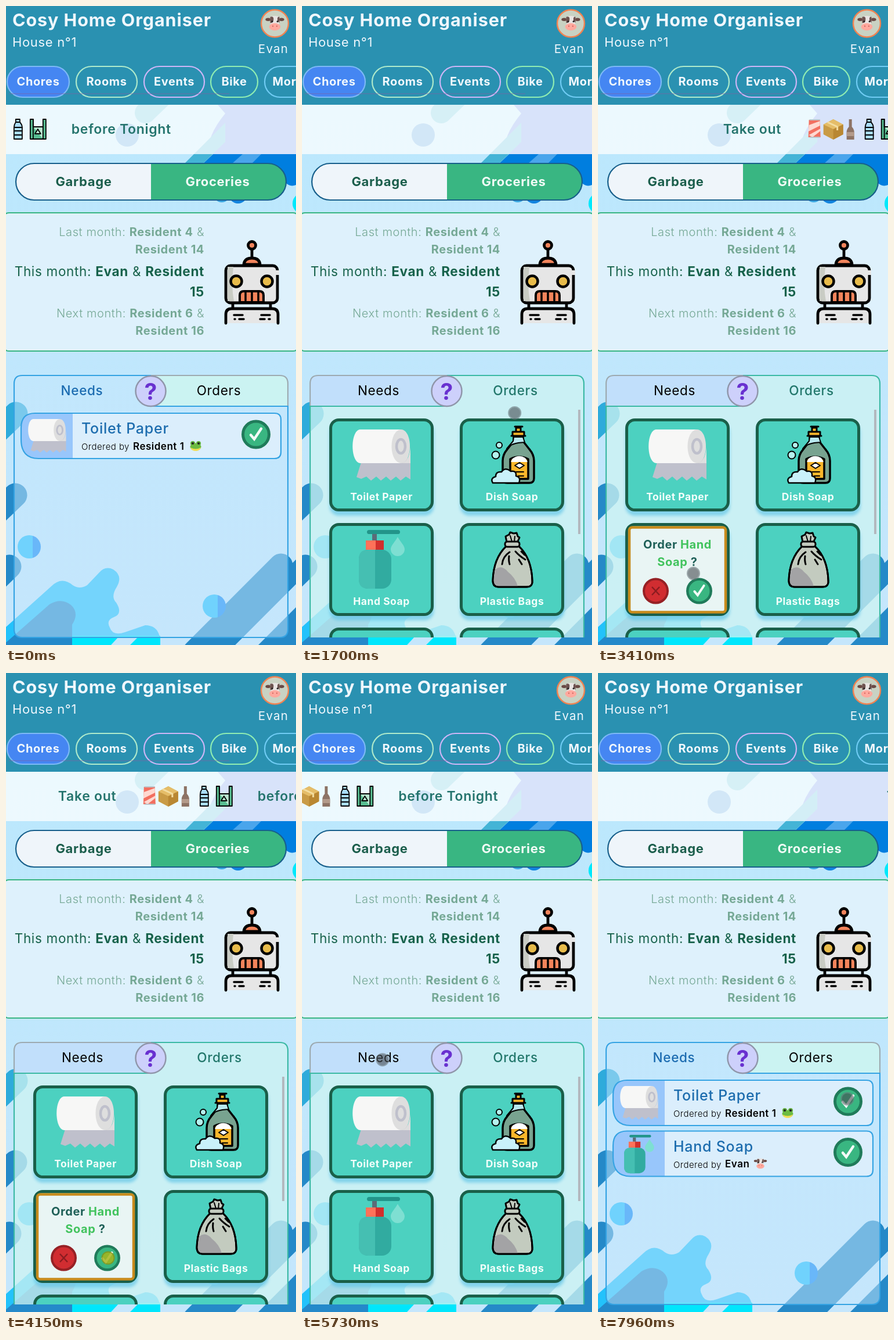
These frames come from a looping animation (500x1100 px, 7990 ms). An HTML page:

```html
<!DOCTYPE html>
<html lang="en">
<head>
<meta charset="utf-8">
<title>House chores</title>
<style>
html, body { margin: 0; width: 100%; height: 100%; overflow: hidden; background: #c1e8fd; }
svg { display: block; width: 100vw; height: 100vh; }
text { font-family: Inter, "Open Sans", sans-serif; letter-spacing: .03em; white-space: pre; }
.b { font-weight: 700; }
.s { font-weight: 600; }
.m { font-weight: 500; }
.l { font-weight: 300; }
.c { text-anchor: middle; }
.e { text-anchor: end; }
.ink { stroke: #000; stroke-linejoin: round; stroke-linecap: round; }
</style>
</head>
<body>
<svg viewBox="0 0 500 1100" preserveAspectRatio="none">
<defs>
  <linearGradient id="sky" x2="0" y2="1"><stop stop-color="#b9e8fd"/><stop offset="1" stop-color="#c5e6fc"/></linearGradient>
  <linearGradient id="duo"><stop offset=".66" stop-color="#1bbefd"/><stop offset=".66" stop-color="#0c88f6"/></linearGradient>
  <filter id="blur" x="-20%" y="-20%" width="140%" height="140%"><feGaussianBlur stdDeviation="2.5"/></filter>
  <clipPath id="panelClip"><path d="M14 690H486V1087H14z"/></clipPath>
  <clipPath id="pillClip"><rect x="17" y="271" width="466" height="63" rx="31.5"/></clipPath>

  <g id="cow">
    <ellipse cx="-10" cy="-5" rx="4" ry="2.4" fill="#6b4a45"/><ellipse cx="10" cy="-5" rx="4" ry="2.4" fill="#6b4a45"/>
    <path d="M-7-9Q0-12 7-9L6 5H-6z" fill="#e9e4e2"/>
    <path d="M-7-9Q-1-11-2-4Q-3 1-7 0zM7-9Q3-10 4-3L7 0z" fill="#6d5350"/>
    <circle cx="-4" cy="-2" r="1.3" fill="#222"/><circle cx="4" cy="-2" r="1.3" fill="#222"/>
    <ellipse cy="6" rx="8.5" ry="5.5" fill="#ffa99e"/>
    <circle cx="-3" cy="5" r="1" fill="#d2665f"/><circle cx="3" cy="5" r="1" fill="#d2665f"/>
  </g>
  <g id="frog">
    <circle cx="-5" cy="-4" r="4" fill="#5fae3c"/><circle cx="5" cy="-4" r="4" fill="#5fae3c"/>
    <ellipse cy="2" rx="9.5" ry="6.5" fill="#6cbb42"/><path d="M-9 3Q0 8 9 3Q7 9 0 9Q-7 9-9 3" fill="#f3dd55"/>
    <circle cx="-5" cy="-4" r="2" fill="#222"/><circle cx="5" cy="-4" r="2" fill="#222"/>
  </g>
  <g id="paper">
    <path d="M17 50H100V86l-8-5-9 7-8-7-9 7-8-7-9 7-8-7-9 7-8-7-9 4-8-3z" fill="#bfc0cc"/>
    <path d="M13 0H84V58H13C-4 56-4 2 13 0z" fill="#f7f7f6"/>
    <path d="M84 0C104 1 104 57 84 58C62 57 62 1 84 0z" fill="#dedede"/>
    <path d="M100 30V58H84Q98 56 100 30" fill="#dedede"/>
    <ellipse cx="83.5" cy="29" rx="7.5" ry="12" fill="#dedede" stroke="#bfc0cc" stroke-width="4.5"/>
  </g>
  <g id="pump">
    <rect x="14" width="57" height="7" rx="3.5" fill="#22958a"/>
    <path d="M23 7H31V18H23z" fill="#5b6c78"/>
    <path d="M12 18H29V34H12z" fill="#ff7159"/><path d="M29 18H43V34H29z" fill="#d22f2c"/>
    <rect y="34" width="56" height="67" rx="16" fill="#31aba0"/>
    <path d="M28 34H16Q0 34 0 50V85Q0 101 16 101H28z" fill="#45bfb2"/>
    <path d="M67 12C72 21 79 27 79 33A12 12 0 0 1 55 33C55 27 62 21 67 12" fill="#7edfd2"/>
  </g>
  <g id="dish" class="ink" stroke-width="3.5">
    <path d="M39 15H55V26L66 40Q74 49 74 60V90Q74 98 66 98H28Q20 98 20 90V60Q20 49 28 40L39 26z" fill="#78a390"/>
    <path d="M35 17H59M37 10H57V17H37zM43 3H51V10H43zM41 1H54" fill="#fbb62b" stroke-width="3"/>
    <path d="M38 26L27 39Q34 29 58 28L55 19H39z" fill="#b9e9f0" stroke-width="2"/>
    <path d="M33 57Q48 49 64 57V91H33z" fill="#fbb62b"/>
    <path d="M34 62H63L59 55Q48 48 37 56z" fill="#fff" stroke="none"/>
    <path d="M41 68L49 63 57 68 49 73z" fill="#fff" stroke-width="2"/>
    <path d="M43 79H56M47 86H56" stroke-width="2"/>
    <path d="M3 98Q-2 90 8 87Q8 78 18 79Q24 70 34 78Q44 76 43 86Q52 88 48 98z" fill="#c9f1fa" stroke-width="2.5"/>
    <circle cx="8" cy="50" r="6.5" fill="#b5f2ee" stroke-width="2"/><circle cx="14" cy="33" r="5" fill="#b5f2ee" stroke-width="2"/>
  </g>
  <g id="bag" class="ink" stroke-width="3">
    <path d="M24 25Q2 46 1 84Q1 95 11 95H59Q70 95 69 84Q68 46 46 25z" fill="#c3cbbf"/>
    <path d="M5 65Q16 56 27 69Q40 79 44 94H11Q1 94 2 82z" fill="#a3a3a5" stroke="none"/>
    <path d="M24 25Q2 46 1 84Q1 95 11 95H59Q70 95 69 84Q68 46 46 25zM30 35Q18 43 17 56M40 34Q47 42 57 48M29 42Q28 50 30 56M50 34L56 40M46 48L51 56" fill="none"/>
    <path d="M25 18L23 8 29 5 31 1 37 3 42 2 44 8 47 10 43 19z" fill="#c3cbbf"/>
    <rect x="22" y="17" width="25" height="9" rx="4" fill="#c3cbbf"/><path d="M31 7L34 17M39 8L38 17" fill="none" stroke-width="2"/>
  </g>
  <g id="tick">
    <circle r="22.5" fill="#39b681" stroke="#207b5a" stroke-width="5"/>
    <path d="M-9 1L-3 8 9-10" fill="none" stroke="#f4fbf8" stroke-width="4.5" stroke-linecap="round"/>
  </g>
  <g id="row">
    <path d="M50 701H463Q474 701 474 712V768Q474 779 463 779H56Q26 779 26 746V726Q26 701 50 701z" fill="#dbeefc"/>
    <path d="M50 701H115V779H56Q26 779 26 746V726Q26 701 50 701z" fill="#98c6fb"/>
    <path d="M50 701H463Q474 701 474 712V768Q474 779 463 779H56Q26 779 26 746V726Q26 701 50 701z" fill="none" stroke="#35a3e3" stroke-width="2.2"/>
    <use href="#tick" x="431" y="737.5"/>
    <text x="130" y="764" font-size="15" class="l">Ordered by</text>
  </g>
  <g id="tile">
    <rect x="-2" y="5" width="180" height="160" rx="16" fill="#5fc4e6" opacity=".65" filter="url(#blur)"/>
    <rect width="175" height="155" rx="14" fill="#4cd1c0" stroke="#1a5f49" stroke-width="5"/>
  </g>
</defs>

<rect width="500" height="1100" fill="url(#sky)"/>

<!-- decorative background -->
<g fill="none" stroke-linecap="round">
  <path d="M240 184L270 155" stroke="#4fbcd6" stroke-width="36"/>
  <circle cx="209" cy="222" r="20" fill="#3f93d8"/>
  <path d="M365 170H500V255H350Q345 225 378 185z" fill="#5b80ea"/>
  <path d="M357 255H500V308Q486 314 474 294L440 271H340z" fill="#007edf"/>
  <path d="M308 271L378 201V234L340 271z" fill="#44b4d6"/>
  <path d="M390 271L408 255H440L424 271z" fill="#4aa5ec"/>
  <circle cx="372" cy="324" r="14" fill="#3ba6e0"/><circle cx="400" cy="324" r="16" fill="#1183df"/>
  <circle cx="512" cy="340" r="18" fill="#00e8fb"/>
  <g stroke="#2589c8" stroke-width="41">
    <path d="M17 702L-25 742" stroke="#2eabdb"/>
    <path d="M16 842L-60 915M6 965L-30 1000M474 963L325 1112"/>
    <path d="M520 954L350 1124" stroke-width="30"/>
    <path d="M500 1035V1100H435z" fill="#2589c8" stroke="none"/>
  </g>
  <path d="M0 1069L78 999Q96 981 115 997Q127 1005 140 997L160 976Q171 963 185 970Q202 981 191 1000Q180 1017 190 1027Q202 1046 186 1052Q172 1057 179 1070Q184 1085 205 1078L240 1066Q267 1066 266 1100H0z" fill="#23c2fb"/>
  <path d="M-5 1100L75 1030Q95 1018 112 1031Q127 1045 114 1065V1100z" fill="#2489ca"/>
  <path d="M114 1100V1084H266V1100z" fill="#00e6fc"/>
  <path d="M181 1100L194 1086H228L214 1100z" fill="#c5e6fc"/>
  <circle cx="40" cy="931" r="20" fill="url(#duo)"/><circle cx="359" cy="1033" r="20" fill="url(#duo)"/>
</g>

<!-- ticker -->
<path d="M0 170H500V255H0z" fill="#fafeff" opacity=".79"/>
<g id="ticker">
  <g font-size="23" fill="#24746d" class="s"><text y="220">Take out</text><text x="344" y="220">before Tonight</text></g>
  <path d="M148 196H167L168 226H147z" fill="#f26f60"/><path d="M148 205L167 198V206L147 216zM148 222L168 211V215L154 226z" fill="#ffd8d0"/><path d="M149 196H167M149 226H167" stroke="#bcc4c9" stroke-width="2"/>
  <path d="M173 204L190 195 207 204V221L190 230 173 221z" fill="#c99b45"/><path d="M173 204L190 195 207 204 190 212z" fill="#e5bd68"/><path d="M190 212L207 204V221L190 230z" fill="#b98732"/><path d="M180 200L197 208V214" fill="none" stroke="#f3dda0" stroke-width="3"/>
  <path d="M217 195H222V208Q226 212 226 217V230H213V217Q213 212 217 208z" fill="#8d7365"/><path d="M213 217H226V224H213z" fill="#b39a8a"/>
  <g class="ink" stroke-width="1.8">
    <path d="M248 195H255V200Q259 204 259 209V229H245V209Q245 204 248 200z" fill="#a9dcf8"/><path d="M245 209H259M245 215H259M245 222H259M248 200H255" fill="none"/>
    <path d="M273 195H278V208H295V195H300V229H273z" fill="#58bd91"/><path d="M278 208H295V229M281 220L286 212 291 220z" fill="#b9e6cf"/><path d="M278 195V229" fill="none"/>
  </g>
</g>

<!-- header -->
<path d="M0 0H500V170H0z" fill="#2a91b1"/>
<g fill="#eff7fd">
  <text x="11" y="35" font-size="30.5" class="b">Cosy Home Organiser</text>
  <text x="11" y="70" font-size="22">House n°1</text>
  <text x="461" y="81" font-size="20.5" class="c" style="letter-spacing:.06em">Evan</text>
</g>
<circle cx="463.5" cy="30" r="23.5" fill="#c9d2c3" stroke="#f08352" stroke-width="2.5"/>
<use href="#cow" transform="translate(463.5 29) scale(1.15)"/>
<g id="pills" font-size="20" class="b c"></g>
<path d="M5 151H385" stroke="#7e62a5" stroke-width="1.3" opacity=".5"/>

<!-- chore toggle -->
<g clip-path="url(#pillClip)"><path d="M17 271H250V334H17z" fill="#eff5fa"/><path d="M250 271H483V334H250z" fill="#39b682"/></g>
<rect x="17" y="271" width="466" height="63" rx="31.5" fill="none" stroke="#175f8b" stroke-width="2.2"/>
<g font-size="22" class="b c"><text x="134" y="310" fill="#1b5e4c">Garbage</text><text x="365" y="310" fill="#f1fbf6">Groceries</text></g>

<!-- monthly turns -->
<rect x="-5" y="356" width="510" height="238" rx="10" fill="#def1fc" stroke="#38b582" stroke-width="2.2"/>
<g class="e" font-size="20" fill="#75a895">
  <text x="342" y="396" class="l">Last month: <tspan class="b">Resident 4</tspan> &amp;</text>
  <text x="342" y="426" class="b">Resident 14</text>
  <text x="342" y="536" class="l">Next month: <tspan class="b">Resident 6</tspan> &amp;</text>
  <text x="342" y="566" class="b">Resident 16</text>
  <g font-size="22.5" fill="#17624b"><text x="342" y="465">This month: <tspan class="b">Evan</tspan> &amp; <tspan class="b">Resident</tspan></text><text x="342" y="500" class="b">15</text></g>
</g>
<g class="ink" stroke-width="4.8" fill="none">
  <path d="M424 418V434"/><circle cx="424" cy="412" r="6.5" fill="#f3845b"/>
  <path d="M410 445Q411 434 424 434Q437 434 438 445z" fill="#f3845b"/>
  <rect x="379" y="447" width="89" height="64" rx="8" fill="#e6e6e6"/>
  <path d="M382 449H392Q388 482 393 508H382z" fill="#c9ccc4" stroke="none"/>
  <path d="M468 463V455" stroke="#e6e6e6" stroke-width="6" stroke-linecap="butt"/>
  <g fill="#e8bb4a" stroke-width="4.5"><circle cx="397" cy="474" r="9.5"/><circle cx="450" cy="474" r="9.5"/></g>
  <path d="M403 510V498Q403 491 410 491H437Q444 491 444 498V510z" fill="#f3845b" stroke-width="4"/><path d="M413 492V507M424 492V507M435 492V507" stroke-width="3.5"/>
  <path d="M379 546V531Q379 521 389 521H459Q469 521 469 531V546" fill="#e6e6e6"/>
  <path d="M391 513V520M456 513V520"/><path d="M393 532H408M402 539H410M394 539H395M440 532H455M438 539H446M453 539H455" stroke-width="3.5"/>
</g>

<!-- needs -->
<g id="needs">
  <path d="M28 636H250V689H486V1073Q486 1087 472 1087H28Q14 1087 14 1073V650Q14 636 28 636z" fill="#c6e8fd" opacity=".5"/>
  <path d="M250 636H472Q486 636 486 650V689H250z" fill="#cbf3f2"/>
  <path d="M250 636H472Q486 636 486 650V689" fill="none" stroke="#9daab0" stroke-width="2.2"/>
  <path d="M250 636H28Q14 636 14 650V1073Q14 1087 28 1087H472Q486 1087 486 1073V689H250" fill="none" stroke="#35a3e3" stroke-width="2.2"/>
  <g font-size="22.5" class="c"><text x="131" y="670" fill="#1b6bb0" class="m">Needs</text><text x="367" y="670">Orders</text></g>
  <use href="#row"/>
  <use href="#paper" transform="translate(38 711) scale(.655)"/>
  <text x="130" y="736" font-size="25" fill="#1c6cae" class="m">Toilet Paper</text>
  <text x="219" y="764" font-size="17" class="s">Resident 1</text><use href="#frog" x="327" y="757"/>
  <g id="soapRow">
    <use href="#row" y="87.5"/>
    <use href="#pump" transform="translate(45 795) scale(.655)"/>
    <text x="130" y="824" font-size="25" fill="#1c6cae" class="m">Hand Soap</text>
    <text x="219" y="851" font-size="17" class="s">Evan</text><use href="#cow" transform="translate(280 844) scale(.8)"/>
  </g>
</g>

<!-- orders -->
<g id="orders">
  <path d="M250 636H472Q486 636 486 650V1087H14V689H250z" fill="#cdf4f2" opacity=".76"/>
  <path d="M28 636H250V689H14V650Q14 636 28 636z" fill="#c1dffb"/>
  <path d="M14 689V650Q14 636 28 636H250" fill="none" stroke="#9daab0" stroke-width="2.2"/>
  <path d="M250 636H472Q486 636 486 650V1087M14 1087V689H250" fill="none" stroke="#3bb9a4" stroke-width="2.2"/>
  <g font-size="22.5" class="c"><text x="132" y="670">Needs</text><text x="368" y="670" fill="#22776b" class="m">Orders</text></g>
  <g clip-path="url(#panelClip)">
    <g id="tiles"></g>
    <g font-size="17.5" fill="#f3fffb" class="b c"><text x="137" y="851">Toilet Paper</text><text x="362" y="851">Dish Soap</text><text x="137" y="1031">Hand Soap</text><text x="362" y="1031">Plastic Bags</text></g>
    <use href="#paper" x="87" y="729"/><use href="#dish" x="326" y="723"/><use href="#pump" x="98" y="902"/><use href="#bag" x="328" y="905"/>
    <g id="ask">
      <rect x="54" y="897.5" width="166" height="146" rx="5" fill="#e9f5f4" stroke="#c88b1c" stroke-width="4.5"/>
      <g font-size="20" class="b c" fill="#1f6058"><text x="137" y="934">Order <tspan fill="#41c35d">Hand</tspan></text><text x="137" y="964"><tspan fill="#41c35d">Soap</tspan> ?</text></g>
      <circle cx="99.5" cy="1007" r="20.5" fill="#d12d31" stroke="#962125" stroke-width="4"/><path d="M93 1000L106 1014M106 1000L93 1014" stroke="#8b1c20" stroke-width="2.5"/>
      <use href="#tick" transform="translate(174.5 1007) scale(.9)"/>
    </g>
    <g id="done"><rect x="52" y="895" width="170" height="150" rx="11" fill="#31a8e1"/><text x="138" y="984" font-size="39" fill="#f3faff" class="b c">Done !</text></g>
  </g>
  <path d="M476 695H480V909H476z" fill="#b3b8be"/>
</g>

<circle cx="249.5" cy="663" r="26" fill="#cdd0fb" stroke="#9096aa" stroke-width="2.5"/>
<text x="250" y="677.5" font-size="39" fill="#6930d0" class="b c">?</text>
<circle id="dot" r="10.5" stroke-width="2"/>
</svg>
<script>
const $ = id => document.getElementById(id);
const LOOP = 7990, TICKER_SPAN = 1036;

$('pills').innerHTML = [
  ['Chores', 2, 107, '#7db9f6', '#4586f2'], ['Rooms', 121, 105, '#aeeacb'], ['Events', 238, 104, '#ceb6f7'],
  ['Bike', 353, 81, '#8fedb2'], ['More', 446, 80, '#70ccf4']
].map(([name, x, w, line, fill = 'none']) =>
  `<rect x="${x}" y="104" width="${w}" height="53" rx="26.5" fill="${fill}" stroke="${line}" stroke-width="2.2"/>
   <text x="${x + w / 2}" y="137" fill="#f1f8fd">${name}</text>`).join('');

for (const y of [712.5, 892.5, 1072.5])
  for (const x of [49.5, 274.5]) $('tiles').innerHTML += `<use href="#tile" x="${x}" y="${y}"/>`;

// Each key is [time, value, ...]; values between keys are linear.
function track(keys, t) {
  let i = 1;
  while (i < keys.length - 1 && t > keys[i][0]) i++;
  const a = keys[i - 1], b = keys[i];
  const k = Math.min(1, Math.max(0, (t - a[0]) / (b[0] - a[0])));
  return a.slice(1).map((v, n) => v + (b[n + 1] - v) * k);
}

const travel = [[0, 731 - TICKER_SPAN], [2580, 143], [4150, 410], [4970, 555], [6570, 813], [7960, TICKER_SPAN + 2], [7990, TICKER_SPAN + 7]];
const pointer = [
  [60, 300, 984], [450, 345, 830], [810, 361, 690], [960, 367, 664], [1350, 367, 664], [1700, 367, 700],
  [2000, 280, 830], [2360, 160, 965], [3260, 160, 965], [3800, 176, 1007], [4450, 176, 1007], [4970, 329, 903],
  [5300, 250, 770], [5650, 140, 666], [6180, 132, 664], [6570, 160, 827], [6850, 232, 872], [7060, 300, 825],
  [7300, 364, 780], [7700, 430, 733], [7990, 430, 733]
];
const presses = [[990, 1150], [2480, 2720], [4080, 4300], [5740, 5900]];
const within = (t, from, to) => t >= from && t < to;
const fade = (t, from, to) => Math.max(0, Math.min(1, (t - from) / 160, (to - t) / 160));
const show = (id, on) => $(id).style.display = on ? '' : 'none';

function draw(t) {
  const [dist] = track(travel, t);
  const x = 500 - (dist + TICKER_SPAN) % TICKER_SPAN;
  $('ticker').setAttribute('transform', `translate(${x} 0)`);

  const ordering = within(t, 1120, 5860);
  show('orders', ordering);
  show('needs', !ordering);
  show('soapRow', t >= 5860);
  $('ask').style.opacity = fade(t, 2680, 4480);
  $('done').style.opacity = fade(t, 4300, 5360);

  const [px, py] = track(pointer, t);
  const pressed = presses.some(([from, to]) => within(t, from, to));
  const dot = $('dot');
  dot.setAttribute('transform', `translate(${px} ${py})`);
  dot.setAttribute('fill', pressed ? '#a8b51c' : '#454b50');
  dot.setAttribute('stroke', pressed ? '#879717' : '#687479');
  dot.style.opacity = t < 60 ? 0 : pressed ? .85 : .6;
}

const start = performance.now();
function tick() {
  draw((performance.now() - start) % LOOP);
  requestAnimationFrame(tick);
}
tick();
</script>
</body>
</html>
```
